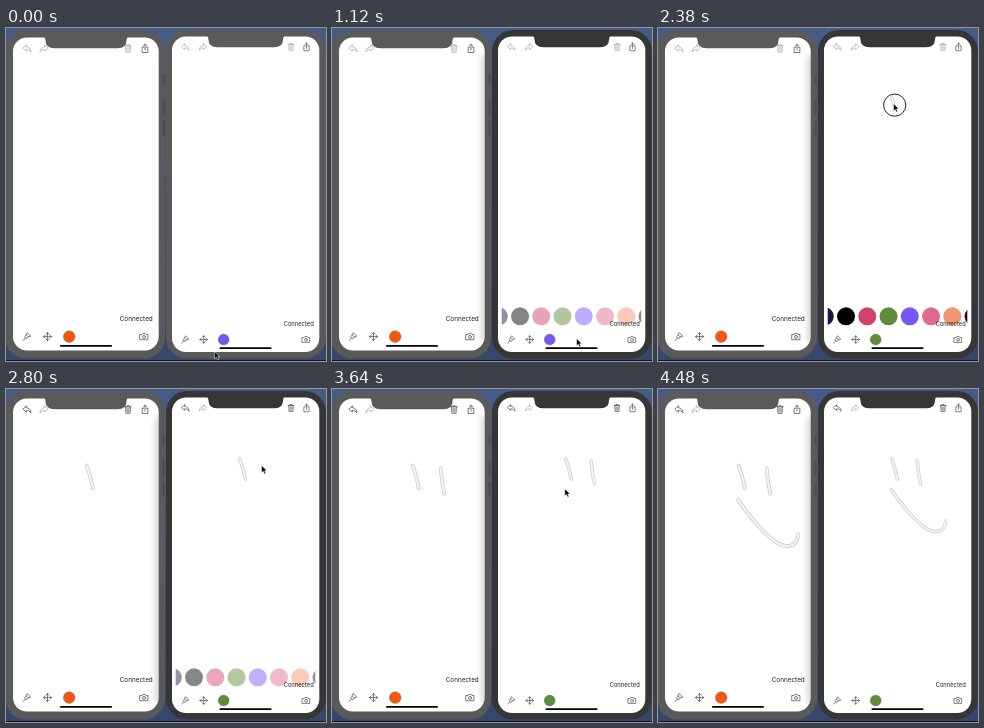
Recreate the animation shown at these times as an HTML page. Size 320 by 333 pixels, loop 4.55 s.

```html
<!DOCTYPE html>
<html lang="en">
<head>
<meta charset="utf-8">
<title>Shared drawing</title>
<style>
html, body { margin: 0; width: 100%; height: 100%; overflow: hidden; background: #35486c; }
svg { display: block; width: 320px; height: 333px; }
.icon { fill: none; stroke: #3a3a3a; stroke-width: .75; stroke-linejoin: round; stroke-linecap: round; }
.off { stroke: #a0a0a0; }
.ink path { fill: none; stroke-linecap: round; stroke: #d0d0d0; stroke-width: 3.5; }
.ink path + path { stroke: #f4f4f4; stroke-width: 1.9; }
#shadow { filter: blur(3px); }
text { font-family: Inter, "Liberation Sans", sans-serif; text-anchor: end; fill: #222; }
</style>
</head>
<body>
<svg id="stage" viewBox="0 0 320 333"></svg>
<script>
const LOOP = 4550, STEP = 70;
const FOCUS = 700, PICK = 1540;

const icons = {
  undo: 'M-.8-4L-4.6-.4-.8 3V1C1.5.9 3.2 1.7 4.5 4 4.3-.2 2-2-.8-2.1Z',
  redo: 'M.8-4L4.6-.4.8 3V1C-1.5.9-3.2 1.7-4.5 4-4.3-.2-2-2 .8-2.1Z',
  trash: 'M-3.5-3H3.5M-1.3-3V-4.3H1.3V-3M-2.8-3L-2.3 4.3H2.3L2.8-3M-1-1.4V2.8M1-1.4V2.8',
  share: 'M-1.4-1.4H-3.2V4.5H3.2V-1.4H1.4M0 1.8V-4.8M-1.8-3L0-4.8 1.8-3',
  brush: 'M.6-4.2L4.2-.4 1.4.4-.8-1.8ZM-.8-1.8L-2.8.2-.4 2.6 1.4.4M-1.7 1.4L-4.2 4.4',
  move: 'M-4.5 0H4.5M0-4.5V4.5M-2.8-1.7L-4.5 0-2.8 1.7M2.8-1.7L4.5 0 2.8 1.7M-1.7-2.8L0-4.5 1.7-2.8M-1.7 2.8L0 4.5 1.7 2.8',
  camera: 'M-4.4-2.3H-2.2L-1.4-3.6H1.4L2.2-2.3H4.4V3.5H-4.4ZM1.7.4A1.7 1.7 0 1 1-1.7.4 1.7 1.7 0 1 1 1.7.4'
};

// Each stroke is drawn on the right and arrives whole on the left.
const strokes = [
  { d: 'M233.6 69.5Q236.6 77 239.3 90', from: 2310, to: 2520, sent: 2660 },
  { d: 'M259.2 72Q260.2 85 262.5 95', from: 2960, to: 3190, sent: 3360 },
  { d: 'M233.2 100.5C243 116 258 132 266 138S287 146 287.6 132', from: 3700, to: 3980, sent: 4130 }
];

const moves = [
  [0, 209, 324], [280, 211, 322], [560, 218, 310], [800, 218, 310], [1120, 245, 311],
  [1400, 235, 292], [1750, 235, 292], [2240, 234, 69.5], [2310, 233.6, 69.5],
  [2520, 239.3, 90], [2590, 240, 90], [2800, 256, 77], [2920, 259.2, 72], [3190, 262.5, 95],
  [3260, 262, 95], [3570, 233.2, 100], [3700, 233.2, 100.5], [3980, 287.6, 132],
  [4060, 287, 133], [4410, 212, 336], [4550, 209, 336]
];
const presses = [[630, 800], [1450, 1580], ...strokes.map(s => [s.from, s.to])];

const palette = ['#1c1746', '#000', '#d2426d', '#5f8c3c', '#7855fa', '#e0698f', '#f0956f', '#1c1008'];

const icon = (name, x, y, s, cls = '') =>
  `<path class="icon ${cls}" d="${icons[name]}" transform="translate(${x} ${y}) scale(${s})"/>`;

const screen = p => `<rect x="${p.sx}" y="${p.sy}" width="${p.w}" height="${p.h}" rx="14" fill="#fff"/>`;

function phone(id, p) {
  const top = p.top, bot = p.bottom, s = p.scale, low = p.sy + 10.8;
  return `<rect id="${id}Body" x="${p.x}" y="2" width="160" height="328.5" rx="21" fill="#5a5a5a"/>
    ${screen(p)}
    <path id="${id}Notch" fill="#5a5a5a" d="M${p.n0 - 2} ${p.sy - 1}H${p.n1 + 2}Q${p.n1} ${p.sy} ${p.n1} ${p.sy + 3}
      Q${p.n1} ${low} ${p.n1 - 9} ${low}H${p.n0 + 9}Q${p.n0} ${low} ${p.n0} ${p.sy + 3}Q${p.n0} ${p.sy} ${p.n0 - 2} ${p.sy - 1}Z"/>
    <g id="${id}Undo">${icon('undo', p.cols[0], top, s)}</g>${icon('redo', p.cols[1], top, s, 'off')}
    <g id="${id}Trash">${icon('trash', p.cols[2], top, s)}</g>${icon('share', p.cols[3], top, s)}
    ${icon('brush', p.cols[0], bot, s)}${icon('move', p.cols[4], bot, s)}${icon('camera', p.cols[5], bot, s)}
    <circle id="${id}Dot" cx="${p.dot}" cy="${bot}" r="${6.6 * s}" fill="${p.color}" stroke="#666" stroke-opacity=".5" stroke-width=".7"/>
    <rect x="${p.bar}" y="${p.barY}" width="52" height="1.8" rx=".9"/>`;
}

const ink = id => strokes.map((s, i) =>
  `<g class="ink" id="${id}${i}">${`<path d="${s.d}" pathLength="1"/>`.repeat(2)}</g>`).join('');

const left = { x: -1, sx: 7, sy: 9.5, w: 145.7, h: 313, n0: 39.5, n1: 120.5, top: 20.5, bottom: 308.6, scale: .89,
  cols: [21, 38, 122, 139, 41.5, 138], dot: 63.2, color: '#f4570c', bar: 54, barY: 317 };
const right = { x: 160, sx: 166, sy: 8.5, w: 147.3, h: 315.5, n0: 202.5, n1: 277, top: 19, bottom: 311.5, scale: .83,
  cols: [179.3, 197, 285, 300.5, 197.7, 300], dot: 217.7, color: '#7657ec', bar: 213.5, barY: 319.3 };

const $ = id => document.getElementById(id);
$('stage').innerHTML = `
  <defs>
    <linearGradient id="sky" x2="0" y2="1"><stop stop-color="#465c86"/><stop offset="1" stop-color="#35486c"/></linearGradient>
    <clipPath id="glass">${screen(left)}</clipPath>
    <clipPath id="tray"><rect x="169.7" y="275" width="139.6" height="26"/></clipPath>
  </defs>
  <rect width="320" height="333" fill="url(#sky)"/>
  <rect y="332" width="320" height="1" fill="#0c111c"/>
  ${phone('left', left)}
  <text x="146.8" y="293" font-size="6.4">Connected</text>
  <g transform="translate(81 76) scale(1.1) translate(-234 -69)">${ink('far')}</g>
  <g clip-path="url(#glass)"><rect id="shadow" x="149.5" y="28" width="20" height="286"/></g>
  <path d="M157.7 46V56M157.7 72V87M157.7 93V108" stroke="#4c4c4c" stroke-width="1.8"/>
  ${phone('right', right)}
  <g id="colors" clip-path="url(#tray)">${palette.map((c, i) =>
    `<circle cx="${166.8 + 21.25 * i}" cy="288.3" r="9" fill="${c}"/>`).join('')}</g>
  <text x="307.7" y="297.7" font-size="5.8">Connected</text>
  ${ink('near')}
  <g id="cursor">
    <circle id="ring" cx=".8" cy=".9" r="11.1" fill="none" stroke="#222" stroke-width="1"/>
    <path d="M-.4-.5V6.8L1.3 5.2 2.5 7.9 3.8 7.3 2.6 4.7H4.9Z" stroke="#fff" stroke-width=".5"/>
  </g>`;

const clamp = v => Math.min(1, Math.max(0, v));
const ramp = (t, a, b) => clamp((t - a) / (b - a));

function cursorAt(t) {
  const i = strokes.findIndex(s => t >= s.from && t <= s.to);
  if (i >= 0) {
    const path = $('near' + i).firstChild;
    const p = path.getPointAtLength(path.getTotalLength() * ramp(t, strokes[i].from, strokes[i].to));
    return [p.x, p.y];
  }
  const n = moves.findIndex(m => m[0] > t);
  const [a, x0, y0] = moves[n - 1], [b, x1, y1] = moves[n];
  const u = ramp(t, a, b), k = u * u * (3 - 2 * u);
  return [x0 + (x1 - x0) * k, y0 + (y1 - y0) * k];
}

function showInk(id, amount) {
  const g = $(id);
  g.style.display = amount > 0 ? '' : 'none';
  for (const p of g.children) p.setAttribute('stroke-dasharray', amount < 1 ? `${amount} 2` : 'none');
}

function enable(id, on) {
  for (const name of ['Undo', 'Trash']) $(id + name).firstChild.classList.toggle('off', !on);
}

function draw(t) {
  const focused = t >= FOCUS;
  for (const part of ['rightBody', 'rightNotch']) $(part).setAttribute('fill', focused ? '#363636' : '#5a5a5a');
  $('shadow').setAttribute('opacity', focused ? .17 : .02);
  $('rightDot').setAttribute('fill', t < PICK ? right.color : palette[3]);
  $('colors').setAttribute('opacity', ramp(t, 860, 1400) * (1 - ramp(t, 2520, 3050)));
  strokes.forEach((s, i) => {
    showInk('near' + i, ramp(t, s.from, s.to));
    showInk('far' + i, t >= s.sent ? 1 : 0);
  });
  enable('right', t >= strokes[0].to);
  enable('left', t >= strokes[0].sent);
  $('cursor').setAttribute('transform', `translate(${cursorAt(t)})`);
  $('ring').style.display = presses.some(([a, b]) => t >= a && t < b) ? '' : 'none';
}

const start = performance.now();
function tick(now) {
  const t = Math.max(0, now - start) % LOOP;
  draw(Math.floor(t / STEP) * STEP);
  requestAnimationFrame(tick);
}
draw(0);
requestAnimationFrame(tick);
</script>
</body>
</html>
```
